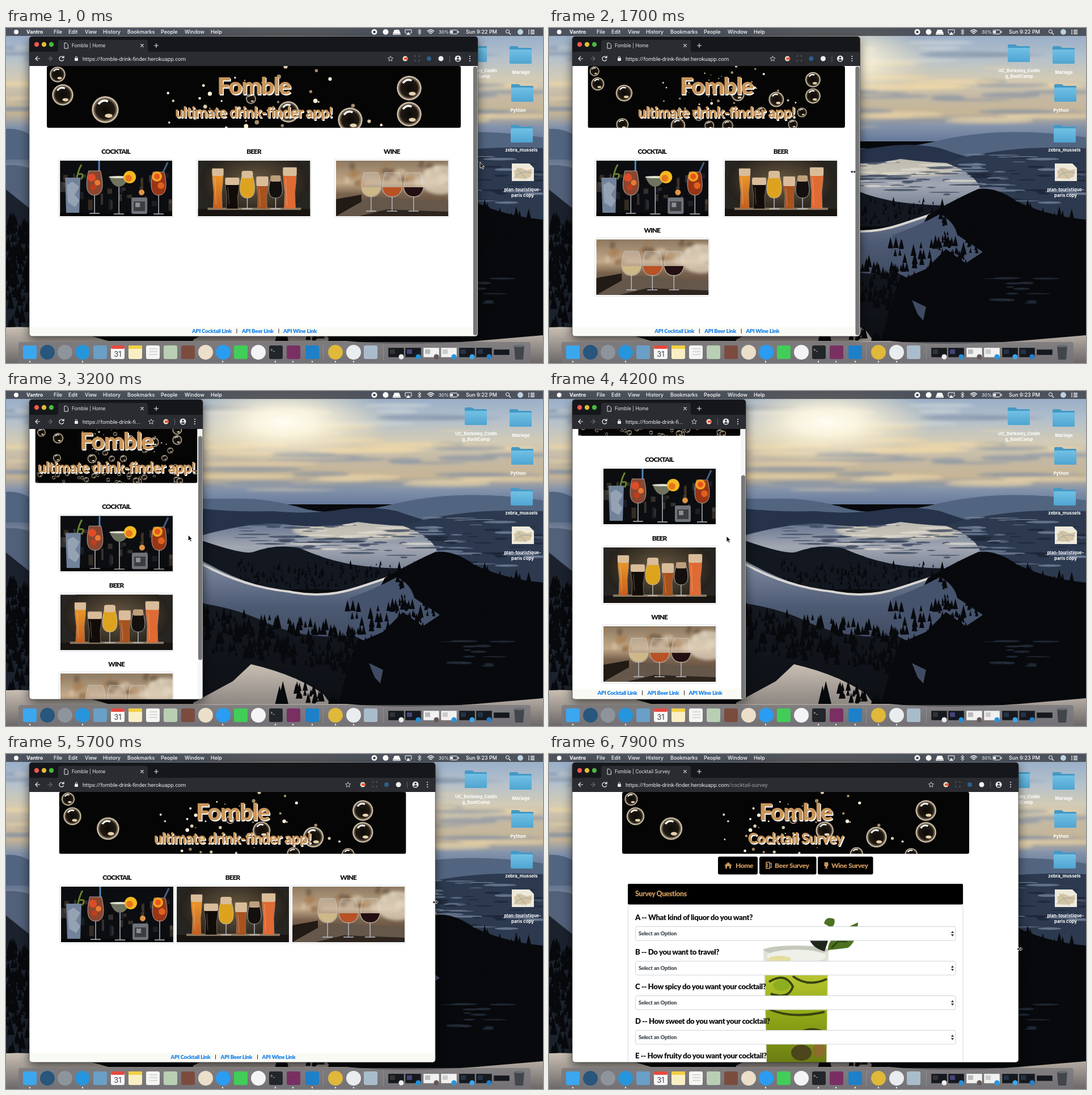
These frames come from a looping animation (947 by 591 pixels, 8 s). An HTML page:

```html
<!DOCTYPE html>
<html lang="en">
<head>
<meta charset="utf-8">
<title>Desktop</title>
<style>
  html, body { margin: 0; width: 100%; height: 100%; overflow: hidden; background: #000; }
  svg { display: block; width: 947px; height: 591px; }
  text { font-family: Inter, sans-serif; white-space: pre; }
  .fun { font-family: Lato, "Open Sans", sans-serif; font-weight: 900; }
  .mid { text-anchor: middle; }
  .url { font-family: Roboto, sans-serif; }
</style>
</head>
<body>
<svg id="stage" viewBox="0 0 947 591" xmlns="http://www.w3.org/2000/svg"></svg>
<script>
const LEFT = 41, TOP = 15, VIEW = 67, BOTTOM = 544, TAN = '#c8965c';
const $ = id => document.getElementById(id);
const random = seed => () => (seed = seed * 16807 % 2147483647) / 2147483647;
const repeat = (n, fn) => Array.from({ length: n }, (_, i) => fn(i)).join('');

// Markup helpers
const rect = (x, y, w, h, fill, more = '') => `<rect x="${x}" y="${y}" width="${w}" height="${h}" fill="${fill}" ${more}/>`;
const oval = (x, y, rx, ry, fill, more = '') => `<ellipse cx="${x}" cy="${y}" rx="${rx}" ry="${ry}" fill="${fill}" ${more}/>`;
const dot = (x, y, r, fill, more) => oval(x, y, r, r, fill, more);
const shape = (d, fill, more = '') => `<path d="${d}" fill="${fill}" ${more}/>`;
const line = (d, stroke, w = 1, more = '') => shape(d, 'none', `stroke="${stroke}" stroke-width="${w}" ${more}`);
const text = (x, y, s, size, fill, more = '') => `<text x="${x}" y="${y}" font-size="${size}" fill="${fill}" ${more}>${s}</text>`;
const group = (body, more = '') => `<g ${more}>${body}</g>`;
const stops = list => list.map(([o, c, a = 1]) => `<stop offset="${o}" stop-color="${c}" stop-opacity="${a}"/>`).join('');
const vertical = (id, list) => `<linearGradient id="${id}" x2="0" y2="1">${stops(list)}</linearGradient>`;
const radial = (id, list) => `<radialGradient id="${id}">${stops(list)}</radialGradient>`;

const defs = `<defs>
  ${vertical('sky', [[0, '#90a8c6'], [.25, '#b3c0cc'], [.45, '#d3cbb5'], [.6, '#c4b9a5'], [.75, '#c6b596'], [.87, '#8493ab'], [1, '#65799a']])}
  ${vertical('valley', [[0, '#64748f'], [.4, '#a3a7b2'], [1, '#5b6880']])}
  ${vertical('slope', [[0, '#8792a8'], [.3, '#4d5a73'], [1, '#1c232f']])}
  ${vertical('ground', [[0, '#c9bfb3'], [1, '#6c6868']])}
  ${vertical('folder', [[0, '#72c0e5'], [1, '#4fa5d1']])}
  ${vertical('lime', [[0, '#b8c533'], [.4, '#95ad17'], [1, '#6b7d12']])}
  ${vertical('warm', [[0, '#8d7a63'], [.4, '#c3a988'], [.6, '#7a634e'], [1, '#4a3a2f']])}
  ${vertical('ale', [[0, '#f0a22e'], [1, '#c65d1d']])}
  ${radial('sun', [[0, '#fffdf2'], [.3, '#fff8e0', .9], [1, '#f6e2b4', 0]])}
  ${radial('ball', [[0, '#0d0a07'], [.68, '#1f1912'], [.84, '#7d6e5a'], [.93, '#e8dcc6'], [1, '#5d503f']])}
  ${radial('lamp', [[0, '#6c5b42'], [1, '#24201b']])}
  <filter id="soft" x="-50%" y="-100%" width="200%" height="300%"><feGaussianBlur stdDeviation="2.5"/></filter>
  <filter id="glow" x="-20%" y="-20%" width="140%" height="140%"><feGaussianBlur stdDeviation="9"/></filter>
  <clipPath id="frameClip"><rect id="frameShape" x="${LEFT}" y="${TOP}" height="${BOTTOM - TOP}" rx="5"/></clipPath>
  <clipPath id="viewClip"><rect x="${LEFT}" y="66" width="900" height="${BOTTOM - 66}"/></clipPath>
  <clipPath id="bannerClip"><rect id="bannerShape" y="${VIEW}" height="109" rx="3"/></clipPath>
  <clipPath id="photoClip"><rect width="198" height="98"/></clipPath>
</defs>`;

function wallpaper() {
  const r = random(77), dark = '#07090c';
  const clouds = repeat(75, () => {
    const x = r() * 947, y = 25 + r() * 150;
    const grey = y > 105 ? .6 : .25;
    const fill = r() < grey ? '#7d8ca4' : y > 60 ? '#f1d9a8' : '#d9dcda';
    return oval(x, y, 30 + r() * 75, 1.5 + r() * 4, fill, 'opacity=".55"');
  });
  const trees = (n, x0, x1, y, size) => {
    let d = '';
    for (let i = 0; i < n; i++) {
      const x = x0 + r() * (x1 - x0), h = size * (.5 + r()), base = y(x, r());
      d += `M${x.toFixed(1)},${(base - h).toFixed(1)}l${(h * .24).toFixed(1)},${h.toFixed(1)}h${(-h * .48).toFixed(1)}z`;
    }
    return shape(d, dark);
  };
  const streaks = (n, x, y, w, h, fill) => repeat(n, () => oval(x + r() * w, y + r() * h, 6 + r() * 28, .6 + r() * 1.8, fill, 'opacity=".75"'));
  return rect(0, 0, 947, 591, dark) + rect(0, 0, 947, 200, 'url(#sky)')
    + group(clouds, 'filter="url(#soft)"') + oval(490, 55, 190, 75, 'url(#sun)')
    + shape('M0,178Q25,176 45,190L400,190Q460,188 520,206T690,198T947,193V260H0Z', '#526580')
    + rect(0, 232, 947, 110, 'url(#valley)')
    + oval(625, 245, 120, 18, '#ecdfc2', 'opacity=".65" filter="url(#soft)"')
    + shape('M340,207Q400,214 470,212Q540,218 590,209Q640,202 690,212Q735,228 775,238Q690,241 620,231Q560,244 500,236T340,256Z', '#26334a')
    + streaks(55, 410, 236, 330, 60, '#39465c') + streaks(16, 520, 232, 210, 50, '#dcd8cf')
    + shape('M700,238Q800,205 947,212V345H740Q800,272 700,238Z', '#2c394f')
    + streaks(28, 740, 222, 207, 88, '#76849b') + streaks(28, 730, 225, 217, 90, '#1b2434')
    + shape('M340,262Q420,290 436,284Q480,268 520,278Q560,296 600,304T700,313L690,350H340Z', '#121720')
    + trees(150, 405, 680, (x, k) => 305 + k * 45, 8)
    + shape('M330,290Q420,345 500,354Q560,368 620,347T710,318L800,440L780,591H330Z', 'url(#slope)')
    + line('M345,305Q420,346 500,354Q560,367 620,347T690,324', '#d9d6d2', 4)
    + shape('M330,372Q400,382 445,402Q520,440 600,432T690,420V570H330Z', dark, 'opacity=".8"')
    + shape('M668,330Q720,300 757,284Q790,280 825,306Q880,332 947,338V560H585Q610,440 668,330Z', dark)
    + shape('M606,365Q650,350 690,328Q715,342 720,365L765,395L735,415L700,390L665,425L630,440L600,425Z', '#46536d')
    + shape('M640,480L665,492L660,516L650,505Z', '#3f4b62')
    + streaks(14, 790, 440, 90, 50, '#27313f')
    + trees(210, 690, 947, (x, k) => 302 + Math.abs(x - 765) * .2 + k * 100, 13)
    + trees(60, 600, 740, (x, k) => 385 + k * 70, 15)
    + trees(190, 345, 620, (x, k) => 385 + (x - 345) * .16 + k * 75, 17)
    + shape('M330,550L400,512L432,482Q510,500 560,535L600,591H330Z', 'url(#ground)')
    + trees(45, 510, 620, (x, k) => 515 + (x - 510) * .5 + k * 25, 17) + trees(5, 482, 490, () => 553, 30)
    + shape('M0,242Q25,240 50,250V365H0Z', '#526079') + shape('M0,285L50,325V540H0Z', '#1b222d')
    + trees(110, 0, 46, (x, k) => 345 + k * 190, 20)
    + shape('M0,528Q90,524 180,552H600Q700,562 830,552L947,542V591H0Z', 'url(#ground)');
}

function desktopIcons() {
  const label = (x, y, s) => text(x, y, s, 7.8, '#fff', 'class="mid" font-weight="700"');
  const folder = (x, y) => shape(`M${x},${y + 2}q0,-2 2,-2h11l4,3h20q2,0 2,2v24q0,2 -2,2h-35q-2,0 -2,-2z`, '#4499c4')
    + rect(x, y + 6, 39, 25, 'url(#folder)', 'rx="2"');
  return folder(809, 29) + label(829, 78, 'UC_Berkeley_Codin') + label(829, 88, 'g_BootCamp')
    + folder(888, 32) + label(908, 81, 'Mariage')
    + folder(891, 99) + label(903, 148, 'Python') + line('M922,147h6q2,-2 -1,-4q-3,-3 -4,1q-3,1 -1,3', '#aab', .8)
    + folder(890, 171) + label(909, 218, 'zebra_mussels')
    + shape('M892,239h31l8,8v23h-39z', '#eee9dc') + shape('M896,252l10,-6 12,5 10,-2 -3,14 -12,3 -15,-1z', '#d5c3a2')
    + line('M895,265q14,-16 33,-9M900,246l18,21', '#8ba5b5')
    + label(911, 288, 'plan-touristique-') + label(911, 298, 'paris copy');
}

function menuBar() {
  const names = ['Vantro', 'File', 'Edit', 'View', 'History', 'Bookmarks', 'People', 'Window', 'Help'];
  const xs = [36, 84, 110, 139, 171, 214, 273, 315, 361];
  const w = '#fff';
  return rect(0, 0, 947, 14, '#3b3d43', 'opacity=".8"') + dot(18, 7, 4, w)
    + names.map((s, i) => text(xs[i], 10.2, s, 9, w, `font-weight="${i ? 500 : 700}"`)).join('')
    + dot(649.5, 7, 5, w) + rect(647.5, 5, 4, 4, '#444') + dot(669.5, 7, 5, w)
    + shape('M685,3h8l3,7h-14zM682,10.5h14v1.5h-14z', w)
    + line('M706,9h-2v-6h11v6h-2', w) + shape('M709.5,7l4,5h-8z', w)
    + line('M726,4l6,5 -3,3V2l3,3 -6,5', w, .9)
    + line('M743,6q6,-6 12,0M745,8q4,-4 8,0M747,10q2,-2 4,0', w, 1.2)
    + text(763, 10, '30%', 8, w) + rect(783, 3.5, 13, 7, 'none', 'stroke="#fff" rx="1.5"') + rect(784, 5, 4, 4, w) + rect(797, 5.5, 1.5, 3, w)
    + text(811, 10.2, '', 9, w, 'id="clock" font-weight="500"')
    + dot(884.5, 6, 3, 'none', 'stroke="#fff"') + line('M887,8.5l3,3', w, 1.2)
    + dot(907, 7, 5, '#bcd0e0') + line('M921,4h2m2,0h7M921,7h2m2,0h7M921,10h2m2,0h7', w, 1.3);
}

function dock() {
  const colors = '#3ba7ee #28567d #8e949b #2795dc #6a9fc8 #f7f7f7 #f8efc5 #f5f5f3 #b9cfb4 #7b4c3e #ecdfc9 #2a9cf2 #41cd58 #f4f4f6 #22262a #7a2f63'.split(' ');
  const round = [1, 2, 3, 10, 11, 13];
  const icon = (x, fill, circle) => circle ? dot(x, 572, 13, fill) : rect(x - 12, 560, 24, 24, fill, 'rx="3"');
  const mini = [688, 718, 750, 781, 813, 843, 874].map((x, i) =>
    rect(x - 14, i === 6 ? 567 : 564, 28, i === 6 ? 10 : 17, i === 2 || i === 3 ? '#f1f1f1' : '#15191f', 'stroke="#777" stroke-width=".5"')
    + (i === 6 ? '' : rect(x - 11, 567, 9, 8, ['#333', '#447', '#bbb', '#ccc', '#243246', '#243246'][i])
      + dot(x + 9, 580, 4.5, ['#eee', '#2590d8', '#655', '#2795dc', '#3ba7ee', '#2480cc'][i]))).join('');
  return rect(22, 554, 903, 40, '#77757a', 'opacity=".72" rx="4"')
    + colors.map((c, i) => icon(42 + 31 * i, c, round.includes(i))).join('')
    + rect(185, 560, 24, 6, '#e6493f', 'rx="2"') + text(197, 580, '31', 13, '#444', 'class="mid"')
    + rect(216, 560, 24, 6, '#f2cf45') + line('M253,566h14m-14,5h14m-14,5h14', '#bbb')
    + text(466, 570, '&gt;_', 7, '#fff') + icon(540, '#1d80c9') + icon(581, '#e0b83a', 1) + icon(613, '#e9edf0', 1) + icon(643, '#a9bccb')
    + line('M559.5,558v28M665.5,558v28', '#99979b', .7) + mini
    + shape('M896,561h18l-2,24h-14z', '#42464b') + oval(905, 561, 9.5, 2, '#666c72')
    + [42, 135, 382, 475, 506, 540, 581, 613].map(x => dot(x, 588.5, 1.2, '#fff')).join('');
}

// Photos, each 198 by 98
const stem = (x, y, base) => line(`M${x},${y}V${base}M${x - 9},${base}h18`, '#b9bfc6', 1.4);
const bowl = (x, y, w, h, fill) => shape(`M${x - w * .75},${y}h${w * 1.5}q${w * .75},${h} ${-w * .75},${h}t${-w * .75},${-h}z`
  .replace(/t.*z/, `q${-w * 1.5},0 ${-w * .75},${-h}z`), fill, 'stroke="#cfd3d6" stroke-width=".7"');
function cocktailPhoto() {
  const r = random(41);
  return rect(0, 0, 198, 98, '#0c0d10')
    + repeat(32, () => rect(r() * 196, 14 + r() * 60, 3 + r() * 7, 5 + r() * 16, ['#5d4a34', '#2c313d', '#5a554d'][r() * 3 | 0], 'opacity=".5"'))
    + rect(0, 92, 198, 6, '#060708') + line('M29,34Q33,14 38,7M33,24q12,-3 4,9', '#66852f', 3)
    + shape('M9,30H36L34,92H11Z', '#71829a') + shape('M12,43l10,-6 12,9 -8,14 8,10 -7,12 -13,-8z', '#b3bdc8', 'opacity=".55"')
    + line('M69,0V31', '#4f87b8', 3) + stem(61, 58, 93) + bowl(61, 18, 14, 43, '#8a4630') + dot(56, 30, 7, '#de4c28') + dot(66, 39, 5, '#e97a30') + dot(59, 47, 5, '#c23d1c')
    + stem(104, 42, 94) + shape('M87,29h34q-6,17 -17,17q-11,0 -17,-17z', '#6f735f') + oval(104, 29, 18, 2, '#dfe1cf')
    + dot(123, 29, 11, '#f3b91e') + dot(121, 31, 6, '#e77520')
    + rect(126, 65, 28, 29, '#6f737b', 'rx="3"') + rect(130, 72, 20, 17, '#3d3d40') + rect(133, 74, 8, 8, '#8b8e94') + dot(144, 56, 5, '#e09542')
    + stem(174, 60, 94) + bowl(174, 20, 13, 41, '#973516') + dot(171, 28, 9, '#f2a01f') + dot(171, 28, 5, '#e8531f') + dot(178, 44, 6, '#e0601f') + line('M182,20l8,-17', '#46607d', 3);
}
function beerPhoto() {
  const glass = (x, y, w, fill, foam = 13) => shape(`M${x},${y}h${w}q0,22 -3,${(85 - y) * .6}l1,${(85 - y) * .4}h${4 - w}l1,${(y - 85) * .4}q-3,${-(85 - y) * .3} -3,${(y - 85) * .6}z`, fill, 'stroke="#918779" stroke-width=".7"')
    + rect(x, y, w, foam, '#d9bd9a', 'rx="3"') + line(`M${x + 5},${y + foam + 4}l2,${60 - y}`, '#fff', 1, 'opacity=".3"');
  return rect(0, 0, 198, 98, '#272522') + oval(100, 38, 96, 58, 'url(#lamp)') + rect(0, 85, 198, 13, '#171411') + rect(17, 83, 165, 4, '#86765f')
    + glass(25, 14, 20, 'url(#ale)') + glass(48, 30, 25, '#120c09') + stem(87, 62, 85) + bowl(87, 28, 13, 38, '#dda31f') + rect(77, 18, 20, 13, '#d9bd9a', 'rx="4"')
    + glass(103, 28, 21, '#a8521e', 17) + stem(137, 62, 85) + bowl(137, 33, 12, 33, '#14100e') + rect(128, 26, 18, 11, '#bd9f7c', 'rx="3"')
    + glass(150, 12, 24, '#e06a33', 15);
}
function winePhoto() {
  const r = random(9);
  const glass = (x, wine) => stem(x, 62, 89) + bowl(x, 21, 17, 43, 'rgba(225,220,210,.25)')
    + shape(`M${x - 17},47h34q-3,16 -17,16q-14,0 -17,-16z`, wine);
  return rect(0, 0, 198, 98, 'url(#warm)')
    + group(repeat(28, () => oval(r() * 198, r() * 46, 3 + r() * 7, 3 + r() * 5, ['#e6d5b8', '#59432f', '#a87846'][r() * 3 | 0], 'opacity=".5"')), 'filter="url(#soft)"')
    + oval(185, 34, 36, 26, '#e9decb', 'opacity=".65" filter="url(#soft)"')
    + shape('M0,68L45,60V98H0Z', '#221a15') + shape('M0,98L60,64L198,72V98Z', '#65574a') + shape('M40,98L90,86L198,90V98Z', '#2e241e')
    + glass(62, '#cdb888') + glass(99, '#b95225') + glass(137, '#241013');
}

function bubbles() {
  const r = random(1234);
  const big = [[19, 15, 14], [28, 51, 19], [103, 77, 24], [639, 39, 22], [639, 85, 22], [535, 95, 22], [426, 81, 19], [360, 58, 9],
    [608, 132, 14], [98, 166, 18], [256, 169, 21], [345, 169, 14], [397, 169, 16], [582, 166, 14], [315, 143, 13], [493, 130, 14]];
  const ball = (x, y, s) => dot(x, y, s, 'url(#ball)') + line(`M${x - s * .5},${y - s * .4}q${s * .3},${-s * .4} ${s * .7},${-s * .2}`, '#fff', s * .16)
    + oval(x + s * .25, y + s * .45, s * .28, s * .15, '#e5d2ad');
  return rect(0, 0, 730, 380, '#050505')
    + repeat(48, () => dot(210 + r() * 390, r() * 150, 1 + r() * 3, ['#d9c9ac', '#a38c6a', '#fff1d8'][r() * 3 | 0]))
    + big.map(b => ball(...b)).join('')
    + repeat(60, () => { const y = 190 + r() * 100; return ball(r() * 730, y, 5 + (y - 180) * .12 * r()); });
}
const embossed = (x, y, s, size, id, spacing) => ['#fff', TAN].map((c, i) =>
  text(x + 1.5 - 1.5 * i, y + 1.5 - 1.5 * i, s, size, c, `class="fun mid ${id}" letter-spacing="${spacing}"`)).join('');

const drinks = [['COCKTAIL', cocktailPhoto], ['BEER', beerPhoto], ['WINE', winePhoto]];
const cards = drinks.map(([name, photo], i) => group(
  text(0, 221.5, name, 11.8, '#111', 'class="fun mid" letter-spacing="-.9"')
  + rect(-101, 231.5, 202, 103, '#fff', 'stroke="#dee2e6" rx="2"')
  + group(photo(), 'transform="translate(-98.5,234)" clip-path="url(#photoClip)"'), `id="card${i}"`)).join('');

function survey() {
  const questions = ['A -- What kind of liquor do you want?', 'B -- Do you want to travel?', 'C -- How spicy do you want your cocktail?',
    'D -- How sweet do you want your cocktail?', 'E -- How fruity do you want your cocktail?'];
  const button = (x, w, inset, s) => rect(x, 181, w, 31.5, '#000', 'rx="3"') + text(x + inset, 201, s, 12, TAN, 'class="fun" letter-spacing="-.4"');
  const glass = shape('M378,343H493L490,544H383Z', '#dfe2d6') + shape('M381,388H491L489,544H384Z', 'url(#lime)')
    + oval(436, 346, 57, 8, '#c4c8bd') + oval(436, 357, 52, 12, '#eef0e9') + oval(407, 362, 20, 6, '#e5dc9d')
    + line('M388,402q28,-18 42,8q-7,24 -39,13M430,392q26,20 60,5M388,450q40,18 98,5M445,490q20,-10 43,2', '#384410', 4)
    + oval(410, 408, 15, 10, '#8dae20') + oval(445, 527, 18, 14, '#4b461b') + oval(476, 523, 11, 12, '#8c6c2c')
    + shape('M460,329q18,-12 32,1l-6,18q-18,-4 -26,-19z', '#20251c')
    + shape('M485,299q3,-14 18,-8q3,11 -6,15zM492,346q-2,-25 53,-49q-2,35 -18,45z', '#4c7121') + line('M498,342l38,-37M508,330l18,1', '#29440f', 3);
  return button(298, 70, 31, 'Home') + button(371, 100.5, 27, 'Beer Survey') + button(474, 97.5, 24, 'Wine Survey')
    + shape('M309,197l7,-6 7,6h-2v5h-3v-4h-4v4h-3v-5z', TAN) + line('M383,191h6v11h-6zM389,193h3v7h-3M385,193v7', TAN, 1.5)
    + shape('M486,191h6q2,8 -2,8v2h2v1h-6v-1h2v-2q-4,0 -2,-8z', TAN)
    + rect(139.5, 229.5, 590.5, 330, '#fff', 'stroke="#d9d9d9" rx="3"') + glass + rect(139, 229, 591, 36.5, '#000', 'rx="2"')
    + text(152, 251, 'Survey Questions', 12.3, TAN, 'class="fun" letter-spacing="-.4"')
    + questions.map((q, i) => {
      const y = 61 * i;
      return text(152, 293 + y, q, 13.2, '#111', 'class="fun" letter-spacing="-.4"')
        + rect(152.5, 304.5 + y, 564.5, 24.5, '#fff', 'stroke="#ced4da" rx="3"')
        + text(158, 320 + y, 'Select an Option', 9.5, '#495057', 'class="fun" letter-spacing="-.25"')
        + shape(`M709,${316 + y}l2.5,-4 2.5,4zM709,${318 + y}l2.5,4 2.5,-4z`, '#343a40');
    }).join('');
}

function footer() {
  const link = (x, s) => text(x, 538, s, 9.7, '#1580e8', 'class="fun" letter-spacing="-.3"');
  return rect(-450, 527, 900, 18, '#fafaf5') + link(-109, 'API Cocktail Link') + link(-21, 'API Beer Link') + link(52, 'API Wine Link')
    + line('M-30,530.5v8M44,530.5v8', '#222');
}

function browser() {
  const light = '#e8eaed';
  const tools = group(line('M-154,49.5l1.3,3 3.2,.3 -2.4,2.2 .7,3.2 -2.8,-1.7 -2.8,1.7 .7,-3.2 -2.4,-2.2 3.2,-.3z', '#d5d7da', .9), 'id="star"')
    + group(line('M-111,51v-2h2m4,0h2v2m0,5v2h-2m-4,0h-2v-2', '#646a70') + dot(-86, 54, 4, '#2d5f8e') + dot(-65, 54, 4.5, '#f0f0f0'), 'id="extras"')
    + group(dot(0, 54, 4.5, '#eee0cb') + rect(-2, 52, 7, 4, '#e8573c'), 'id="addon"')
    + line('M-49.5,49v11', '#5f6368') + dot(-35, 54, 5.5, light) + dot(-35, 52.3, 1.7, '#303134') + oval(-35, 56.5, 3, 1.6, '#303134')
    + [50, 54, 58].map(y => dot(-14, y, 1.1, light)).join('');
  return rect(LEFT, TOP, 900, 52, '#16171b') + shape('M88,42q4,0 4,-4V25q0,-4 4,-4h150q4,0 4,4v13q0,4 4,4z', '#2a2c31') + rect(LEFT, 42, 900, 25, '#2a2c31')
    + ['#f4574f', '#dfbd36', '#48b83f'].map((c, i) => dot(54 + 13 * i, 29, 4.2, c)).join('')
    + line('M103,26.5h3.5l3,3v6.5h-6.5z', light) + text(116, 34, '', 8.3, light, 'id="tabName"')
    + line('M237.5,28.5l5,5m0,-5l-5,5M261,31h8m-4,-4v8', light, 1.1)
    + line('M60,54h-8m4,-4l-4,4 4,4', light, 1.2) + line('M73,54h8m-4,-4l4,4 -4,4', '#6a6d72', 1.2)
    + line('M101,51.5a4,4 0 1 0 .7,4M102,49v3.5h-3.5', light, 1.3)
    + rect(121, 53, 6, 5, light, 'rx="1"') + line('M122.5,53v-2q1.5,-2 3,0v2', light)
    + `<text class="url" x="135" y="57.5" font-size="9.7" fill="${light}"><tspan id="host"></tspan><tspan id="path" fill="#9aa0a6"></tspan></text>`
    + group(tools, 'id="tools"');
}

$('stage').innerHTML = defs + wallpaper() + desktopIcons() + menuBar()
  + rect(LEFT, 22, 0, 527, '#000', 'id="shadow" opacity=".6" filter="url(#glow)"')
  + group(rect(LEFT, 66, 900, 480, '#fff')
    + group(group(
      group(group(bubbles(), 'id="bannerArt"'), 'clip-path="url(#bannerClip)"')
      + group(embossed(0, 117, 'Fomble', 42, 'title', -1.8) + embossed(0, 158, '', 26, 'subtitle', -.9), 'id="heading"')
      + group(cards, 'id="cards"') + group(survey(), 'id="survey"'), 'id="page"')
      + group(footer(), 'id="footer"')
      + group(rect(-9, 67, 9, 478, '#f5f5f5') + rect(-8, 68, 7, 0, '#777', 'id="thumb" rx="3.5"'), 'id="scrollbar"'), 'clip-path="url(#viewClip)"')
    + browser(), 'clip-path="url(#frameClip)"')
  + `<rect id="outline" x="${LEFT}" y="${TOP}" height="${BOTTOM - TOP}" rx="5" fill="none" stroke="#333" stroke-width=".7"/>`
  + dock()
  + shape('M0,0V10.5l2.5,-2.2 1.8,3.7 1.8,-.9 -1.8,-3.5h3.2z', '#111', 'stroke="#fff" stroke-width=".8" id="arrow"')
  + shape('M-5,0l3.5,-3v2h3v-2l3.5,3 -3.5,3v-2h-3v2z', '#111', 'stroke="#fff" stroke-width=".8" id="resizer"');

const rightEdge = [[0, 832], [300, 832], [1100, 662], [2500, 397], [2900, 347], [4500, 347], [5200, 580], [5900, 828]];
const scrolling = [[3100, 0], [3800, 97]];
const pointer = [[0, 836, 237], [300, 830, 250], [1100, 651, 258], [2500, 384, 248], [2900, 346, 248], [3300, 313, 256], [4200, 313, 256],
  [4500, 347, 258], [5200, 580, 260], [5900, 828, 262], [6300, 215, 290], [6400, 215, 290], [6800, 560, 356], [7200, 560, 356], [7900, 830, 344]];

function sample(keys, t, k = 1) {
  const i = keys.findIndex(key => key[0] > t);
  if (i < 0) return keys[keys.length - 1][k];
  if (i === 0) return keys[0][k];
  const a = keys[i - 1], b = keys[i];
  return a[k] + (b[k] - a[k]) * (t - a[0]) / (b[0] - a[0]);
}
const set = (id, values) => Object.entries(values).forEach(([k, v]) => $(id).setAttribute(k, v));
const move = (id, x, y = 0, scale = 1) => set(id, { transform: `translate(${x},${y}) scale(${scale})` });
const show = (id, on) => set(id, { visibility: on ? 'visible' : 'hidden' });

function draw(t) {
  const right = sample(rightEdge, t), width = right - LEFT, center = LEFT + width / 2 + .5;
  const container = width >= 789 ? 730 : width >= 652 ? 612 : width >= 505 ? 453.5 : width >= 379 ? 335 : width - 20;
  const columns = width >= 652 ? 3 : width >= 505 ? 2 : 1;
  const scroll = columns === 1 ? sample(scrolling, t) : 0;
  const left = center - container / 2, onSurvey = t >= 6400;

  for (const id of ['frameShape', 'shadow', 'outline']) set(id, { width });
  set('bannerShape', { x: left, width: container });
  move('bannerArt', left, VIEW, container / 730);
  move('heading', center);
  document.querySelectorAll('.subtitle').forEach(n => n.textContent = onSurvey ? 'Cocktail Survey' : 'ultimate drink-finder app!');
  move('page', 0, -scroll);
  drinks.forEach((_, i) => move('card' + i, left + container / columns * (i % columns + .5), 139 * Math.floor(i / columns)));
  // The footer follows the content once one column overflows the view
  move('footer', center, columns === 1 ? 95 - scroll : 0);
  show('cards', !onSurvey);
  show('footer', !onSurvey);
  show('survey', onSurvey);
  show('scrollbar', t < 4600);
  move('scrollbar', right);
  set('thumb', { y: 68 + scroll * .831, height: columns === 1 ? 395 : 474 });

  const narrow = width < 340, room = (narrow ? right - 91 : right - 154) - 135;
  const host = 'https://fomble-drink-finder.herokuapp.com';
  $('host').textContent = room > 200 ? host : host.slice(0, Math.floor((room - 38) / 3.6)) + '...';
  $('path').textContent = onSurvey ? '/cocktail-survey' : '';
  $('tabName').textContent = onSurvey ? 'Fomble | Cocktail Survey' : 'Fomble | Home';
  move('tools', right);
  move('star', narrow ? 63 : 0);
  move('addon', narrow ? -65 : -128);
  show('extras', !narrow);
  $('clock').textContent = t < 3300 ? 'Sun 9:22 PM' : 'Sun 9:23 PM';

  const resizing = t >= 300 && t < 3000 || t >= 4500 && t < 6000 || t >= 7800;
  const x = sample(pointer, t), y = sample(pointer, t, 2);
  move('arrow', x, y);
  move('resizer', x, y);
  show('arrow', !resizing);
  show('resizer', resizing);
}

const start = performance.now();
function tick() {
  const t = Math.max(0, performance.now() - start) % 8000;
  draw(Math.floor(t / 100) * 100);
  requestAnimationFrame(tick);
}
tick();
</script>
</body>
</html>
```
